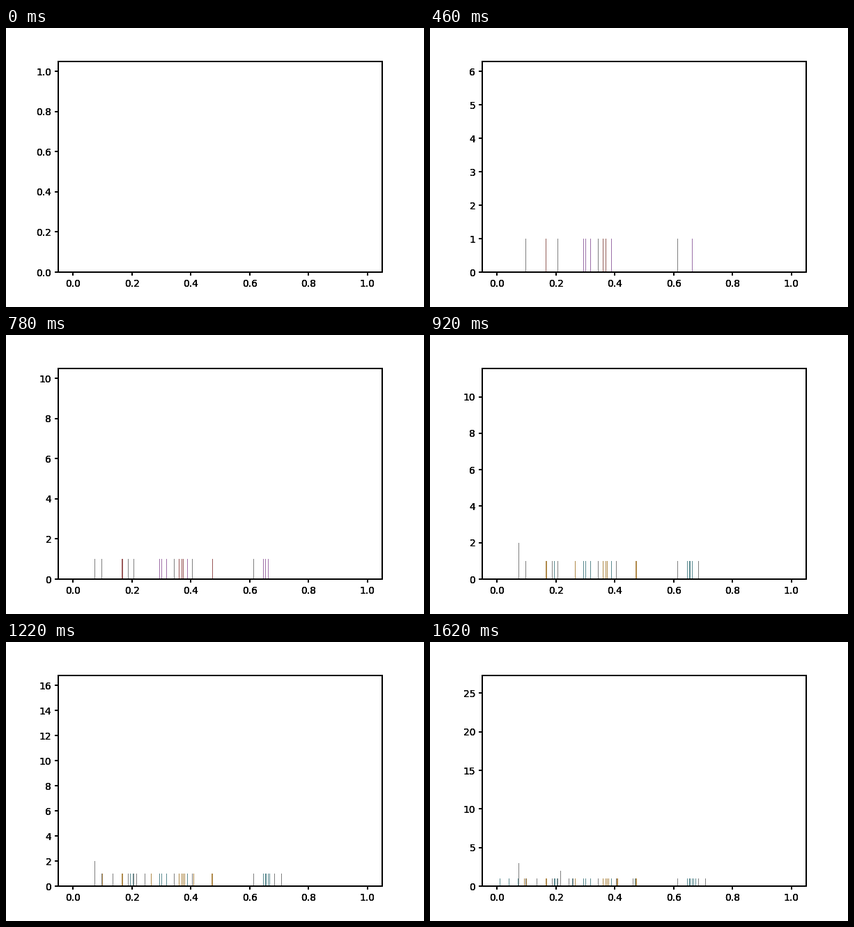
A matplotlib script that plays this animation: 600x400 px, repeating every 1640 ms.

```python
import numpy as np
import matplotlib.pyplot as plt
from matplotlib.animation import FuncAnimation
from matplotlib.patches import Rectangle
from matplotlib.transforms import IdentityTransform, blended_transform_factory

W, H, DPI = 600, 400, 100
FRAMES, STEP = 82, 20

# (first frame, last frame, warm bins, cool bins, neutral bins), bins as pixel columns
GROUPS = [
    (5, 14, [166, 248], [260], [137]),
    (15, 30, [167, 252, 296], [220, 223, 230, 369, 372, 376],
     [127, 175, 183, 241, 355]),
    (31, 39, [254], [], [267]),
    (40, 52, [208, 295], [178, 182, 373], [187, 199, 385, 395]),
    (53, 70, [138, 256, 268, 269], [100, 113, 179, 294, 378], [153, 205]),
    (71, 81, [135], [126, 204, 381], [291]),
]
# extra counts: (pixel column, frame)
REPEATS = [(127, 46), (127, 62), (187, 76)]

# (warm, cool) pairs, one per new histogram
PAIRS = [
    ("#4a9095", "#b89b50"),
    ("#b08a4a", "#5b8a90"),
    ("#c0583a", "#50a068"),
    ("#94605a", "#9b70a8"),
    ("#9a5858", "#a070a8"),
]
NEUTRAL = "#808080"

PEAK_AT = [3, 4, 14, 30, 39, 52, 70, 81]
PEAKS = [1, 2, 6, 6, 10, 13, 19, 26]

plt.rcParams.update({
    "font.family": "DejaVu Sans",
    "font.size": 10,
    "axes.linewidth": 1.44,
    "xtick.major.width": 1.44,
    "ytick.major.width": 1.44,
})

fig = plt.figure(figsize=(W / DPI, H / DPI), dpi=DPI, facecolor="white")
# stacked copies of the axes give the heavy, hard-edged labels
layers = [fig.add_axes([0.125, 0.125, 0.775, 0.755]) for _ in range(3)]
for layer in layers:
    layer.set_xlim(-0.05, 1.05)
    layer.patch.set_visible(False)
ax = layers[0]
columns = blended_transform_factory(IdentityTransform(), ax.transData)


def make_bars():
    rng = np.random.default_rng(4)
    bars = []
    for first, last, *kinds in GROUPS:
        members = [(x, kind) for kind, xs in enumerate(kinds) for x in xs]
        births = np.linspace(first, last, len(members)).round()
        for (x, kind), birth in zip(members, rng.permutation(births)):
            rect = Rectangle((x, 0), 1, 0, lw=0, transform=columns)
            ax.add_artist(rect)
            bars.append((rect, x, kind, birth))
    return bars


bars = make_bars()


def count(x, birth, frame):
    if frame < birth:
        return 0
    return 1 + sum(x == col and frame >= at for col, at in REPEATS)


def draw(frame):
    peak = np.floor(np.interp(frame, PEAK_AT, PEAKS) + 1e-6)
    for layer in layers:
        layer.set_ylim(0, 1.05 * peak)
    colors = (*PAIRS[frame % len(PAIRS)], NEUTRAL)
    for rect, x, kind, birth in bars:
        rect.set_height(count(x, birth, frame))
        rect.set_visible(frame >= birth)
        rect.set_facecolor(colors[kind])
    return []


anim = FuncAnimation(fig, draw, frames=FRAMES, interval=STEP,
                     init_func=lambda: draw(0), repeat=True, repeat_delay=0)
plt.show()
```
